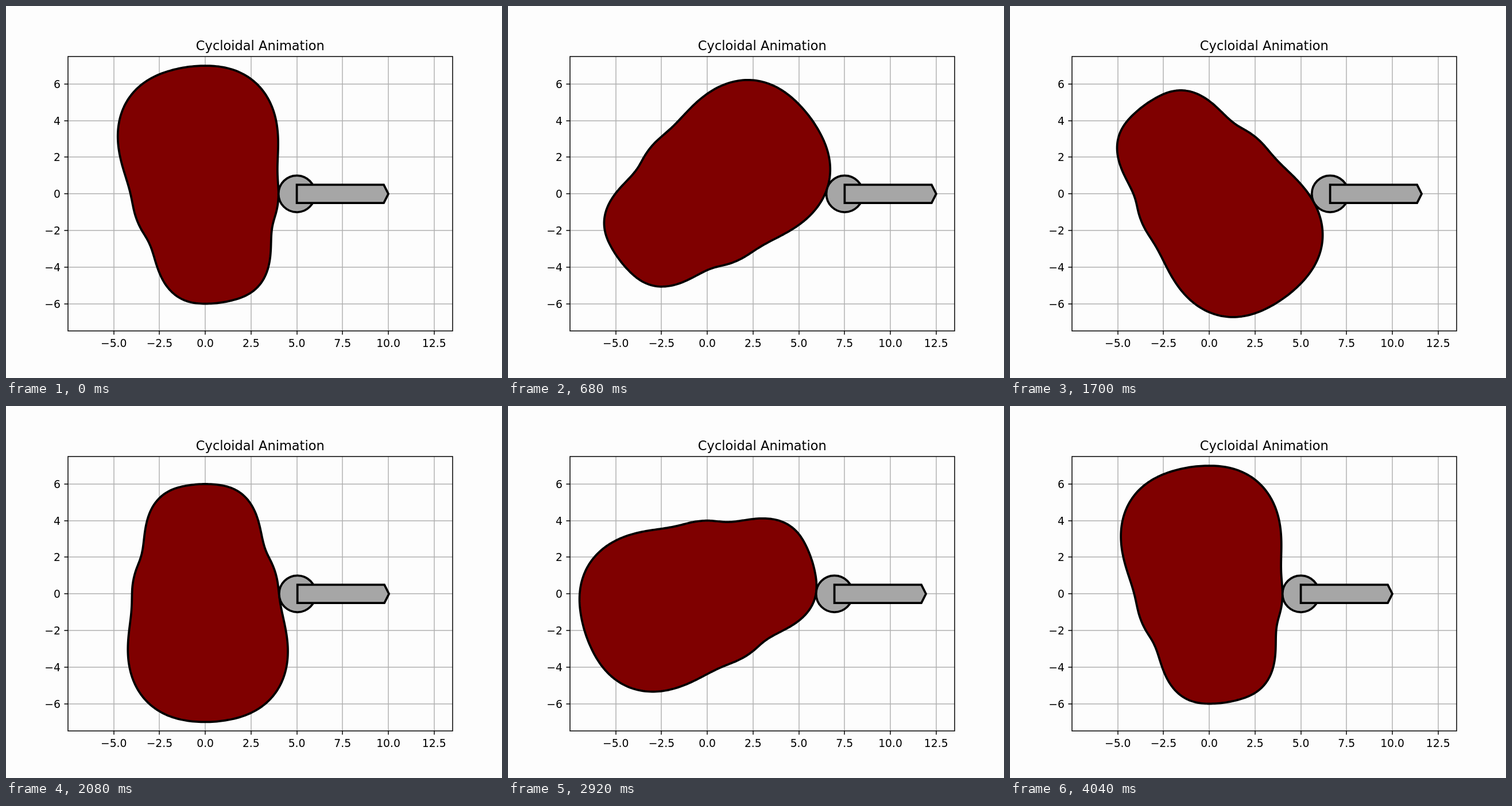
Recreate the animation shown at these times as an HTML page. Size 864 by 648 pixels, loop 4.06 s.

```html
<!DOCTYPE html>
<html lang="en">
<head>
<meta charset="utf-8">
<title>Cycloidal Animation</title>
<style>
  html, body { margin: 0; width: 100%; height: 100%; overflow: hidden; background: #fdfdfd; }
  svg { display: block; }
  text { font: 18.75px "DejaVu Sans", sans-serif; fill: #000; }
  .title { font-size: 22.5px; }
  .grid { stroke: #b0b0b0; stroke-width: 1.5; }
  .axis { stroke: #000; stroke-width: 1.5; fill: none; }
  .part { stroke: #000; stroke-width: 3.75; fill: #a6a6a6; }
  #cam { fill: #7f0000; stroke-linejoin: round; }
</style>
</head>
<body>
<svg width="864" height="648" viewBox="0 0 864 648">
  <g id="plot"></g>
  <path id="cam" class="part"/>
  <g id="follower">
    <circle id="roller" class="part"/>
    <path id="rod" class="part"/>
  </g>
  <rect class="axis" x="108" y="88" width="670" height="478"/>
  <text class="title" x="442.8" y="76.8" text-anchor="middle">Cycloidal Animation</text>
</svg>
<script>
  const UNIT = 669.6 / 21, CX = 108 + 7.5 * UNIT, CY = 327.24;
  const FRAME_MS = 20, FRAMES = 203, STEP = 360 / 202.5;
  const RAD = Math.PI / 180;
  const $ = id => document.getElementById(id);

  // Cam segments: end angle, radius at that end
  const SEGMENTS = [
    [90, 7], [105, 7], [195, 4], [210, 4],
    [270, 6], [285, 6], [345, 4], [360, 4]
  ];

  function radius(deg) {
    const a = ((deg % 360) + 360) % 360;
    let start = 0, from = 4;
    for (const [end, to] of SEGMENTS) {
      if (a < end) {
        const u = (a - start) / (end - start);
        return from + (to - from) * (u - Math.sin(2 * Math.PI * u) / (2 * Math.PI));
      }
      start = end;
      from = to;
    }
    return from;
  }

  // Centre of the unit roller resting against the rotated cam
  function rollerCentre(turn) {
    let best = 0;
    for (let a = -16; a <= 16; a += 0.2) {
      const r = radius(turn + a);
      const y = r * Math.sin(a * RAD);
      if (Math.abs(y) < 1) {
        best = Math.max(best, r * Math.cos(a * RAD) + Math.sqrt(1 - y * y));
      }
    }
    return best;
  }

  function drawPlot() {
    let out = "";
    const line = (cls, x1, y1, x2, y2) =>
      out += `<line class="${cls}" x1="${x1}" y1="${y1}" x2="${x2}" y2="${y2}"/>`;
    const label = (text, x, y, anchor) =>
      out += `<text x="${x}" y="${y}" text-anchor="${anchor}">${text.replace("-", "\u2212")}</text>`;

    for (let v = -5; v <= 12.5; v += 2.5) {
      const x = CX + v * UNIT, px = Math.round(x);
      line("grid", px, 88, px, 566);
      line("axis", px, 566, px, 572.6);
      label(v.toFixed(1), x, 594, "middle");
    }
    for (let v = -6; v <= 6; v += 2) {
      const py = Math.round(CY - v * UNIT);
      line("grid", 108, py, 778, py);
      line("axis", 101.4, py, 108, py);
      label(String(v), 94.9, py + 7, "end");
    }
    $("plot").innerHTML = out;
  }

  function drawParts() {
    const points = [];
    for (let a = 0; a < 360; a++) {
      const r = radius(a) * UNIT;
      points.push((r * Math.cos(a * RAD)).toFixed(2) + " " + (-r * Math.sin(a * RAD)).toFixed(2));
    }
    $("cam").setAttribute("d", "M" + points.join("L") + "Z");
    $("roller").setAttribute("r", UNIT);
    const h = UNIT / 2, body = 4.75 * UNIT, tip = 5 * UNIT;
    $("rod").setAttribute("d", `M0 ${-h}H${body}L${tip} 0L${body} ${h}H0Z`);
  }

  function tick(now) {
    const turn = Math.floor(now / FRAME_MS) % FRAMES * STEP;
    $("cam").setAttribute("transform", `translate(${CX} ${CY}) rotate(${turn})`);
    $("follower").setAttribute("transform", `translate(${CX + rollerCentre(turn) * UNIT} ${CY})`);
    requestAnimationFrame(tick);
  }

  drawPlot();
  drawParts();
  tick(0);
</script>
</body>
</html>
```
